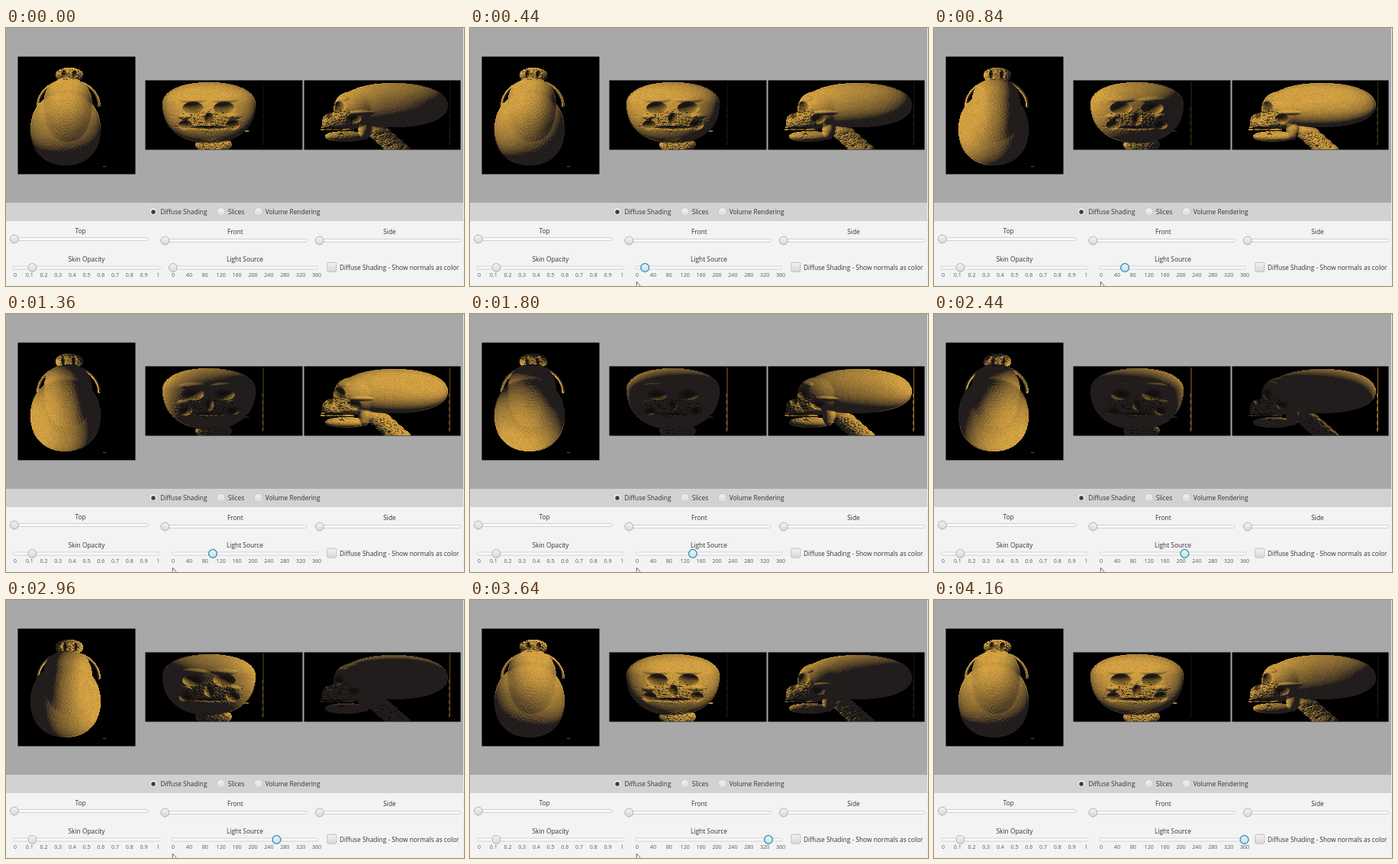
Write an HTML page with a canvas that moves like this. It is 600 px wide and 338 px high and loops after 4.2 s.

```html
<!DOCTYPE html>
<html lang="en">
<head>
<meta charset="utf-8">
<title>Skull shading viewer</title>
<style>
  html, body { margin: 0; width: 100%; height: 100%; overflow: hidden; background: #a8a8a8; }
  svg, canvas { position: absolute; left: 0; top: 0; width: 600px; height: 338px; }
  text { font: 8.4px "Open Sans", "Noto Sans", sans-serif; fill: #333; }
  .mid { text-anchor: middle; }
  .tick { font-size: 7.1px; fill: #585858; text-anchor: middle; }
</style>
</head>
<body>
<svg id="ui" viewBox="0 0 600 338">
  <defs>
    <linearGradient id="knobFill" x2="0" y2="1">
      <stop offset="0" stop-color="#f4f4f4"/><stop offset="1" stop-color="#d8d8d8"/>
    </linearGradient>
  </defs>
  <rect width="600" height="229" fill="#a8a8a8"/>
  <rect y="229" width="600" height="24" fill="#d2d2d2"/>
  <rect y="253" width="600" height="85" fill="#f3f3f3"/>
  <rect x="599" width="1" height="338" fill="#eee"/>
</svg>
<canvas id="views" width="600" height="338"></canvas>
<script>
const LOOP = 4200;
const ui = document.getElementById('ui');
const ctx = document.getElementById('views').getContext('2d');

// ---- controls ----
function add(tag, attrs, text) {
  const el = document.createElementNS('http://www.w3.org/2000/svg', tag);
  for (const k in attrs) el.setAttribute(k, attrs[k]);
  if (text !== undefined) el.textContent = text;
  ui.append(el);
  return el;
}
const knob = (cx, cy, stroke = '#a9a9a9') => add('circle',
  { cx, cy, r: 5.4, fill: 'url(#knobFill)', stroke, 'stroke-width': 0.9 });

function slider(label, x0, x1, y, labelGap, value = 0) {
  add('text', { x: (x0 + x1) / 2, y: y - labelGap, class: 'mid' }, label);
  add('rect', { x: x0, y: y - 2, width: x1 - x0, height: 4, rx: 2,
    fill: '#f9f9f9', stroke: '#c9c9c9', 'stroke-width': 0.8 });
  return knob(x0 + 1.8 + (x1 - x0 - 4) * value, y);
}
function ticks(count, x, step, label) {
  for (let i = 0; i < count; i++) add('text', { x: x + i * step, y: 326.2, class: 'tick' }, label(i));
}
function radio(label, x, on) {
  knob(x, 241, '#c6c6c6');
  if (on) add('circle', { cx: x, cy: 241, r: 2.7, fill: '#3c3c3c' });
  add('text', { x: x + 9.2, y: 244.4 }, label);
}

radio('Diffuse Shading', 193, true);
radio('Slices', 281.5);
radio('Volume Rendering', 330.5);
slider('Top', 9, 186, 276.5, 8);
slider('Front', 206.5, 394, 278.5, 8.3);
slider('Side', 409, 596, 278.5, 8.3);
slider('Skin Opacity', 9, 202, 314, 8, 0.125);
const lightKnob = slider('Light Source', 217, 409, 314, 8);
ticks(11, 12, 18.72, i => i / 10);
ticks(10, 219, 20.9, i => i * 40);
add('rect', { x: 420.8, y: 307.2, width: 12, height: 12, rx: 1.5,
  fill: 'url(#knobFill)', stroke: '#bcbcbc', 'stroke-width': 0.9 });
add('text', { x: 437, y: 316.6 }, 'Diffuse Shading - Show normals as color');
const cursor = add('path', { d: 'M218.3 332.3v11l2.6-2.4 5 .1z',
  fill: '#fff', stroke: '#444', 'stroke-width': 0.8 });

// ---- skull geometry ----
let seed = 7;
const rand = () => (seed = (seed * 16807) % 2147483647) / 2147483647;

// Row of items, u running from 0 to 1
const row = (n, make) => Array.from({ length: n }, (_, i) => make(i / (n - 1)));
// The same item on both sides of a middle line
const pair = (mid, gap, ...rest) => [[mid - gap, ...rest], [mid + gap, ...rest]];

// blobs: x, y, half width, rise, drop, depth
// dents: x, y, rx, ry, height      rough: x, y, rx, ry
const views = [
  {
    x: 16, y: 38, w: 153, h: 153,
    light: (X, Y, Z) => [X, Y, Z],
    blobs: [
      [78, 133, 46, 48, 47, 42],
      [81, 100, 32, 34, 50, 36],
      [83, 62, 18, 10, 10, 8],
      ...row(60, u => [82 - 40 * Math.cos(u * Math.PI), 102 - 33 * Math.sin(u * Math.PI), 2, 2, 2, 4])
    ],
    dents: pair(83, 7, 61, 3, 6, -6),
    rough: [[83, 61, 22, 10]],
    rings: [[82, 102], [78, 143]]
  },
  {
    x: 183, y: 69, w: 205, h: 90,
    light: (X, Y, Z) => [X, -Z, -Y],
    blobs: [
      [266, 100, 61, 29, 51, 44],
      [272, 153, 24, 10, 10, 14],
      ...row(3, u => [267 + 4 * u, 129 + 6 * u, 50 + 4 * u, 0.9, 0.9, 8])
    ],
    dents: [
      ...pair(265.5, 20.5, 105, 14, 8, -13), ...pair(265.5, 21, 94, 19, 4, 3),
      ...pair(266, 32, 116, 10, 4, 4), ...pair(266, 31, 127, 9, 6, -9),
      [266, 119, 6, 8, -10], [266, 131, 26, 2.5, -5]
    ],
    rough: [[266, 122, 54, 19], [272, 153, 28, 10]],
    rail: 336.5
  },
  {
    x: 391, y: 69, w: 204, h: 90,
    light: (X, Y, Z) => [Y, -Z, -X],
    blobs: [
      [508, 102, 71, 30, 28, 34],
      [454, 108, 25, 25, 24, 22],
      [434, 123, 20, 13, 11, 15],
      [445, 142, 27, 7, 7, 11],
      [470, 128, 9, 16, 18, 14],
      ...row(5, u => [483 + 32 * u, 132 + 28 * u, 15, 9, 9, 9]),
      ...row(3, u => [440 - 6 * u, 127 + 6 * u, 30 - 4 * u, 0.9, 0.9, 8])
    ],
    dents: [
      [436, 104, 8, 8, -14], [424, 113, 5, 6, -8], [456, 119, 9, 6, -7],
      [466, 111, 17, 3, 3], [441, 92, 9, 4, 3], [430, 132, 18, 2.5, -7]
    ],
    rough: [[434, 123, 30, 24], [500, 147, 34, 19]],
    rail: 581
  }
];

const inside = (x, y, [cx, cy, rx, ry]) =>
  Math.max(0, 1 - ((x - cx) / rx) ** 2 - ((y - cy) / ry) ** 2);

// Domes melted together, 0 outside
function heightAt(blobs, x, y) {
  let sum = 0;
  for (const [cx, cy, rx, rise, drop, depth] of blobs) {
    const q = Math.abs((x - cx) / rx) ** 2.2 + Math.abs((y - cy) / (y < cy ? rise : drop)) ** 2.2;
    if (q < 1) sum += (depth * Math.sqrt(1 - q)) ** 3;
  }
  return Math.cbrt(sum);
}

function build(v) {
  const { w, h } = v, size = w * h;
  const height = new Float32Array(size);
  v.shade = new Float32Array(size);
  v.normal = new Float32Array(size * 3);
  v.image = ctx.createImageData(w, h);
  let grain = 0.5;
  for (let i = 0; i < size; i++) {
    const x = v.x + i % w + 0.5, y = v.y + Math.floor(i / w) + 0.5;
    grain = (grain + rand()) / 2;
    let z = heightAt(v.blobs, x, y);
    if (!z) continue;
    let shade = 0.86 + 0.14 * rand();
    for (const d of v.dents) {
      const k = inside(x, y, d);
      z += d[4] * k;
      if (d[4] < 0) shade *= 1 - 0.5 * k;
    }
    const rough = Math.min(1, 1.6 * Math.max(...v.rough.map(r => inside(x, y, r))));
    z += (0.3 + 2 * rough) * (grain - 0.5);
    if (grain < 0.32 * rough) shade *= 0.4;
    if (v.rings) {
      const d = Math.min(...v.rings.map(([a, b]) => Math.hypot(x - a, y - b)));
      z += 0.1 * Math.sin(d * 1.6) * Math.max(0, 1 - d / 42);
    }
    height[i] = z;
    v.shade[i] = shade;
  }
  const pick = (i, j) => v.shade[j] ? height[j] : height[i];
  for (let i = 0; i < size; i++) {
    if (!v.shade[i]) continue;
    const dx = (pick(i, i - 1) - pick(i, i + 1)) / 2;
    const dy = (pick(i, i - w) - pick(i, i + w)) / 2;
    const len = Math.hypot(dx, dy, 1);
    v.normal.set([dx / len, dy / len, 1 / len], i * 3);
  }
  add('rect', { x: v.x - 0.5, y: v.y - 0.5, width: w + 1, height: h + 1 });
}
views.forEach(build);

// ---- lighting ----
const DARK = [36, 31, 30], GOLD = [224, 171, 70];

function paint(v, deg) {
  const a = (deg + 12) * Math.PI / 180, n = v.normal, px = v.image.data;
  const [lx, ly, lz] = v.light(-Math.sin(a) * 0.87, -Math.cos(a) * 0.87, 0.5);
  for (let i = 0; i < v.shade.length; i++) {
    const s = v.shade[i];
    px[i * 4 + 3] = 255;
    if (!s) continue;
    const dot = n[i * 3] * lx + n[i * 3 + 1] * ly + n[i * 3 + 2] * lz;
    const b = Math.min(1, Math.max(0, dot * 1.05 + 0.04)) ** 0.72 * s;
    for (let c = 0; c < 3; c++) px[i * 4 + c] = DARK[c] * s + (GOLD[c] - DARK[c]) * b;
  }
  ctx.putImageData(v.image, v.x, v.y);
  if (v.rail) {
    ctx.globalAlpha = 0.12 + 0.65 * Math.sin(deg * Math.PI / 360) ** 2;
    ctx.fillStyle = '#c9983c';
    ctx.fillRect(v.rail, 70, 1, 83);
    for (let y = 104; y < 152; y += 9) ctx.fillRect(v.rail - 1, y, 1, 5);
    ctx.globalAlpha = 1;
  } else {
    ctx.fillStyle = '#6d5528';
    ctx.fillRect(127, 181, 4, 1);
  }
}

// The light turns in steps of 10 degrees, gaining a little speed
function angleAt(t) {
  const u = Math.min(1, Math.max(0, (t - 90) / 3820));
  return Math.floor(36 * u ** 1.1) * 10;
}

let shown = -1;
const start = performance.now();
function frame() {
  const t = Math.floor((performance.now() - start) % LOOP / 40) * 40;
  const deg = angleAt(t), focus = t >= 80;
  if (deg !== shown) {
    views.forEach(v => paint(v, deg));
    lightKnob.setAttribute('cx', 218.8 + deg * 0.5217);
    shown = deg;
  }
  lightKnob.setAttribute('stroke', focus ? '#2f9fd0' : '#a9a9a9');
  lightKnob.setAttribute('stroke-width', focus ? 1.5 : 0.9);
  cursor.setAttribute('visibility', t >= 200 && t < 4080 ? 'visible' : 'hidden');
  requestAnimationFrame(frame);
}
frame();
</script>
</body>
</html>
```
